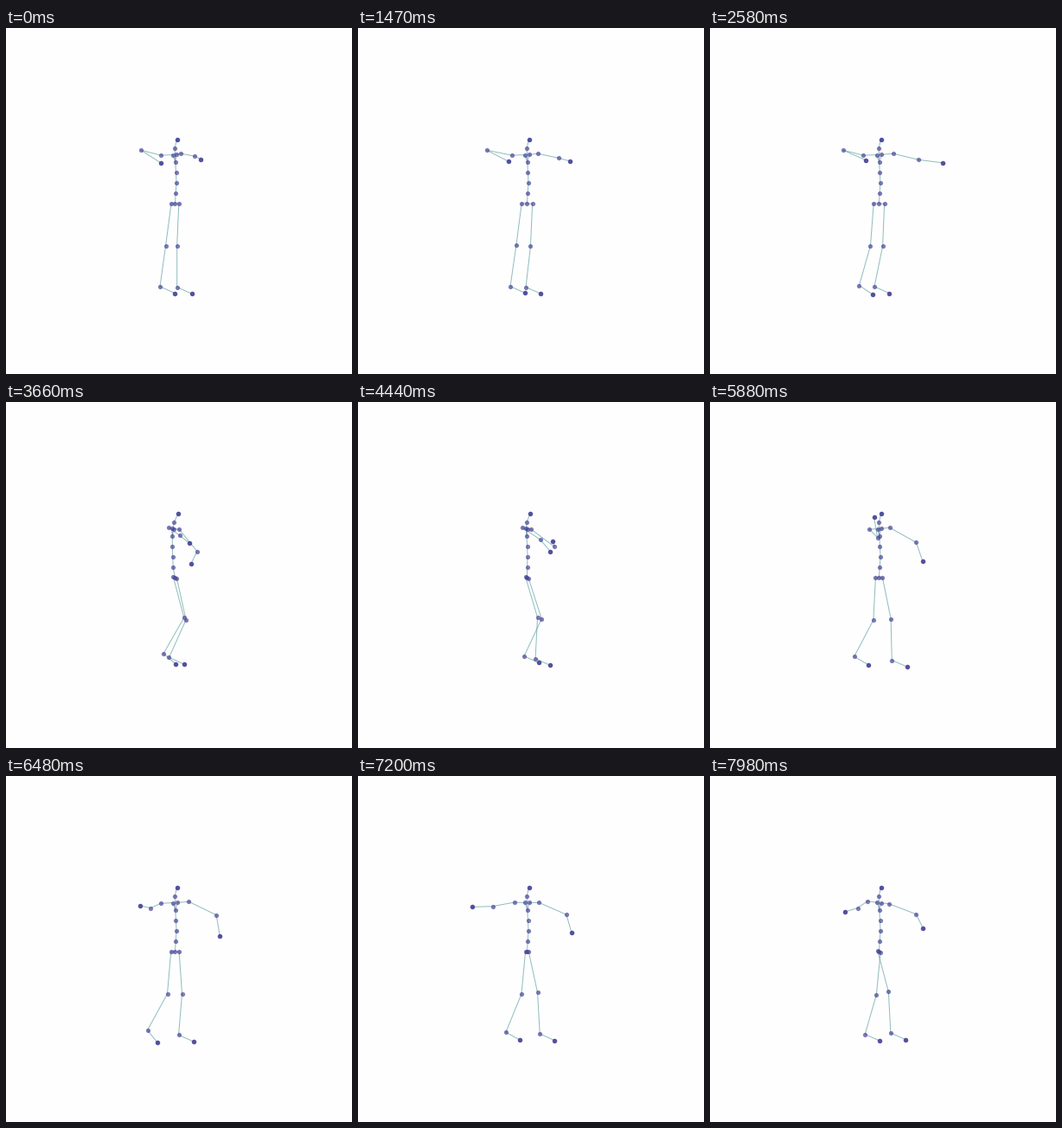
Recreate the animation shown at these times as a matplotlib script. Size 400 by 400 pixels, loop 8000 ms.

```python
import numpy as np
import matplotlib.pyplot as plt
from matplotlib.animation import FuncAnimation
from matplotlib.collections import LineCollection

SIZE, DPI = 400, 100
FRAMES, INTERVAL = 400, 20
PX = 72 / DPI
DOT = (0.28, 0.26, 0.59)
BONE = (0.373, 0.62, 0.627, 0.68)
SHIFT = 0.8

PELVIS = np.array([196.2, 203.8])
SPINE_Y = np.array([129.6, 139.8, 156, 168, 179.6, 192])
THIGH, SHIN, FOOT = 49, 47.7, 18.8


def vec(*xs):
    return np.array(xs, float)


def ease(s, start, end):
    u = np.clip((s - start) / (end - start), 0, 1)
    return u * u * (3 - 2 * u)


def hump(s, centre, width):
    return np.exp(-((s - centre) / width) ** 2)


def phases(s):
    """Spread the arm, turn away, reach, turn back, settle."""
    return (ease(s, 0, 2.6), ease(s, 2.6, 3.6), ease(s, 3.7, 5.2),
            ease(s, 5.3, 6.4), ease(s, 6.5, 8))


def swing(angle, length):
    """Offset of a bone hanging at an angle in degrees from straight down."""
    a = np.radians(angle)
    return length * vec(np.sin(a), np.cos(a))


def leg(hip, thigh, shin, pitch):
    knee = hip + swing(thigh, THIGH)
    ankle = knee + swing(shin, SHIN)
    toe = ankle + swing(90 - pitch, FOOT)
    return np.vstack([PELVIS, hip, knee, ankle, toe])


def legs(s):
    spread, turn, _, back, settle = phases(s)
    half = (4.4 + 1.8 * ease(s, 0, 1.5) - 8.3 * turn
            + 6.8 * ease(s, 4.2, 6.3) - 6.4 * settle)
    hip = vec(-half, 0.14 * (5 - half))

    near = leg(PELVIS + hip,
               -7.5 + 26 * hump(s, 4.25, 1.15) + 2 * back,
               -8 - 17 * ease(s, 1.3, 4) - 4 * hump(s, 6.3, 0.7)
               + 9 * ease(s, 6.6, 8),
               24 + 10 * hump(s, 2.5, 0.6) + 28 * hump(s, 6.5, 0.5))
    far = leg(PELVIS - hip,
              -2.5 + 17.5 * ease(s, 2.5, 3.75) + 5.5 * hump(s, 5, 0.5)
              - 11 * hump(s, 6.5, 0.6),
              -11 * spread - 19 * hump(s, 3.6, 0.55) + 18 * ease(s, 3.8, 5)
              - 12 * hump(s, 6.4, 0.6) - 4 * settle,
              24 + 17 * hump(s, 3.6, 0.5) - 5 * hump(s, 5.2, 0.5))
    return [near, far]


def arm(chest, shoulder, upper, fore):
    base = vec(chest[0], 147.3)
    collar = base + (shoulder - base) * (0.17, 0.1)
    elbow = shoulder + upper
    return np.vstack([chest, collar, shoulder, elbow, elbow + fore])


def arms(s, chest):
    spread, turn, reach, back, settle = phases(s)
    fling = hump(s, 7.2, 0.45)

    shoulder = vec(180 - 2 * spread + 23 * turn - 21 * ease(s, 4.7, 6.45)
                   + 3 * settle, 148 - 2.5 * settle)
    upper = (vec(-20.5, -6) - vec(9, 0) * hump(s, 1.3, 1.2)
             + turn * vec(41.5, 31.5) + reach * vec(12, -11)
             - back * vec(44, 9) + settle * vec(0, 2.5) - fling * vec(14, 2))
    fore = (vec(23.5, 15) + spread * vec(2.5, -3.5) + turn * vec(-33, 2.5)
            + reach * vec(11, -42) + back * vec(-15, 25.5)
            + settle * vec(-3, 7) - fling * vec(11, 0)
            - vec(0, 14) * hump(s, 5.7, 0.3))
    near = arm(chest, shoulder, upper, fore)

    shoulder = vec(203 + 9.5 * spread - 23.5 * turn + 23 * ease(s, 4, 6.5)
                   - 4.5 * settle, 146 + 2.5 * settle)
    upper = (vec(16, 3) + ease(s, 0.2, 2.6) * vec(15, 4)
             + ease(s, 2.4, 3.5) * vec(-18.5, 2) + reach * vec(16.5, 10)
             + back * vec(3, -3.5) - settle * vec(0.5, 3.5))
    stretch = (6 * ease(s, 0, 0.8) + 18 * ease(s, 1.5, 2.4)
               - 19.5 * ease(s, 2.2, 3.6))
    fore = (vec(7 + stretch, 3.5) + turn * vec(0, 5.5) + reach * vec(0, 9)
            + back * vec(-7.5, 6) + settle * vec(4, -8))
    far = arm(chest, shoulder, upper, fore)
    return [near, far]


def pose(s):
    """Return the bone chains; each one ends in a head, hand or toe."""
    turned = ease(s, 2.6, 3.6) - ease(s, 5, 6.4)
    x = (vec(198.3, 196, 196.6, 197.3, 197.8, 197)
         + turned * vec(1.7, 0, 0, 0, 0, 0)
         - hump(s, 3.7, 0.6) * vec(0, 1, 3.5, 4.2, 4.3, 3))
    spine = np.column_stack([x, SPINE_Y])
    return [np.vstack([PELVIS, spine[::-1]])] + arms(s, spine[2]) + legs(s)


fig = plt.figure(figsize=(SIZE / DPI, SIZE / DPI), dpi=DPI, facecolor="#fefefe")
ax = fig.add_axes([0, 0, 1, 1])
ax.set(xlim=(SHIFT, SIZE + SHIFT), ylim=(SIZE + SHIFT, SHIFT))
ax.axis("off")

bones = LineCollection([], colors=[BONE], linewidths=PX, zorder=1)
ax.add_collection(bones)


def dots(alpha, width):
    return ax.scatter([], [], s=(width * PX) ** 2, color=[DOT + (alpha,)],
                      linewidths=0, zorder=2)


joints = dots(0.7, 5.2)
tips = dots(0.92, 5.5)


def draw(frame):
    chains = pose(frame * INTERVAL / 1000)
    bones.set_segments(chains)
    joints.set_offsets(np.vstack([PELVIS] + [c[1:-1] for c in chains]))
    tips.set_offsets([c[-1] for c in chains])
    return bones, joints, tips


anim = FuncAnimation(fig, draw, frames=FRAMES, interval=INTERVAL,
                     init_func=lambda: draw(0), repeat=True, repeat_delay=0)
plt.show()
```
